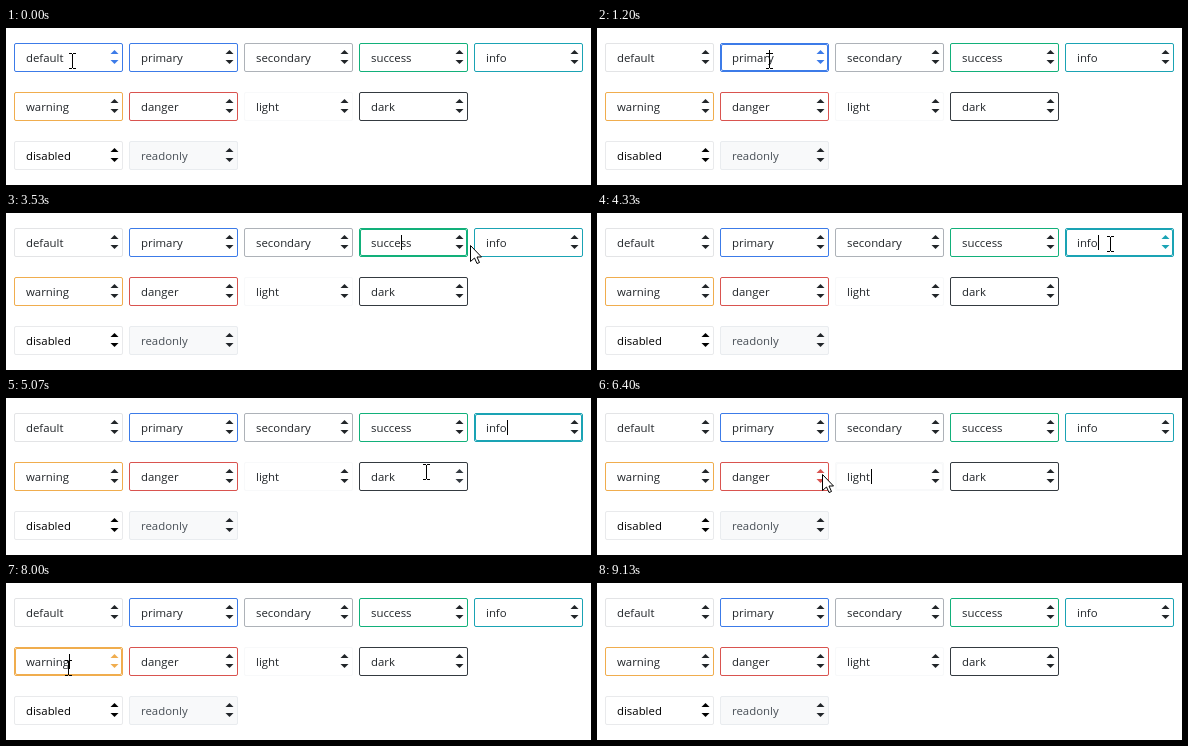
Animation, 585 px wide and 157 px high, one loop 9190 ms. Source, as an HTML page with a canvas:

```html
<!DOCTYPE html>
<html lang="en">
<head>
<meta charset="utf-8">
<title>Number input colours</title>
<style>
html, body { margin: 0; width: 100%; height: 100%; overflow: hidden; background: #fff; }
canvas { display: block; }
</style>
</head>
<body>
<canvas id="stage" width="585" height="157"></canvas>
<script>
const ctx = document.getElementById('stage').getContext('2d');
const LOOP = 9190, TICK = 200 / 3;
const W = 109, H = 29, PAD = 12, INK = '#212529';
const FONT = '11.4px "Open Sans", "Noto Sans", sans-serif';

const rows = [
  { default: '#3c7be8', primary: '#3c7be8', secondary: '#adb2b8', success: '#12b07a', info: '#1aa3b4' },
  { warning: '#f0ad4e', danger: '#d9534f', light: '#f8f9fa', dark: '#343a40' },
  { disabled: '#e9eaec', readonly: '#e9ecef' }
];
const fields = rows.flatMap((row, r) => Object.entries(row).map(([label, color], c) => ({
  label, color, x: 8 + c * 115, y: 15 + r * 49, active: r < 2
})));

// Where the pointer clicks, and on which tick
const visit = (tick, label, x, y) => ({ tick, x, y, field: fields.find(f => f.label === label) });
const visits = [
  visit(2, 'default', 66, 33),
  visit(18, 'primary', 172, 33),
  visit(32, 'secondary', 288, 33),
  visit(47, 'success', 396, 27),
  visit(61, 'info', 513, 31),
  visit(77, 'dark', 420, 74),
  visit(90, 'light', 292, 74),
  visit(104, 'danger', 180, 72),
  visit(120, 'warning', 62, 85),
  visit(137, 'none', 43, 170)
];

// Each trip starts 12 ticks before its click, slows down over 10 ticks and sags a little
function pointerAt(tick) {
  const next = Math.max(1, visits.findLastIndex(v => tick >= v.tick - 12));
  const from = visits[next - 1], to = visits[next];
  const u = Math.min(1, Math.max(0, (tick - to.tick + 12) / 10));
  const ease = Math.sin(u * Math.PI / 2);
  return [
    Math.round(from.x + (to.x - from.x) * ease),
    Math.round(from.y + (to.y - from.y) * ease + 3 * Math.sin(u * Math.PI))
  ];
}

function polygon(points, fill, stroke) {
  ctx.beginPath();
  points.forEach(([x, y]) => ctx.lineTo(x, y));
  ctx.closePath();
  ctx.fillStyle = fill;
  ctx.fill();
  if (stroke) {
    ctx.strokeStyle = stroke;
    ctx.stroke();
  }
}

function ring(f, inset, color) {
  ctx.beginPath();
  ctx.roundRect(f.x + inset + .5, f.y + inset + .5, W - 1 - 2 * inset, H - 1 - 2 * inset, 1.5);
  ctx.strokeStyle = color;
  ctx.stroke();
}

function drawField(f, hovered, focused) {
  const { label, color, x, y, active } = f;
  const lit = hovered || focused;
  if (label === 'readonly') {
    ctx.fillStyle = '#f8f9fa';
    ctx.fillRect(x + 1, y + 1, W - 2, H - 2);
  }
  ring(f, 0, label === 'default' && !lit ? '#e3e4e6' : color);
  if (focused) ring(f, 1, color);

  const ink = label === 'disabled' ? '#000' : INK;
  ctx.fillStyle = label === 'readonly' ? '#495057' : ink;
  ctx.fillText(label, x + PAD, y + 19);

  const mid = x + 100.5, arrowColor = hovered && active ? color : ink;
  for (const [base, tip] of [[11, 7], [17, 21]]) {
    polygon([[mid - 4, y + base], [mid, y + tip], [mid + 4, y + base]], arrowColor);
  }
}

// The caret stands at the letter gap nearest to the click
function drawCaret({ field, x }) {
  const start = field.x + PAD;
  const gaps = [...field.label].map((_, i) => start + ctx.measureText(field.label.slice(0, i + 1)).width);
  const nearest = gaps.reduce((a, b) => Math.abs(b - x) < Math.abs(a - x) ? b : a);
  ctx.fillStyle = '#000';
  ctx.fillRect(Math.round(nearest + .5), field.y + 7, 1, 15);
}

function drawBeam(x, y) {
  ctx.fillStyle = '#000';
  ctx.fillRect(x, y - 7, 1, 14);
  for (const edge of [y - 8, y + 7]) {
    ctx.fillRect(x - 3, edge, 3, 1);
    ctx.fillRect(x + 1, edge, 3, 1);
  }
}

function drawArrow(x, y) {
  const shape = [[0, 0], [0, 16], [4, 12.5], [6.5, 18], [9, 17], [6.5, 11.5], [11, 11.5]];
  polygon(shape.map(([dx, dy]) => [x + dx - .5, y + dy + .5]), '#fff', '#000');
}

function draw(tick) {
  ctx.fillStyle = '#fff';
  ctx.fillRect(0, 0, 585, 157);
  ctx.font = FONT;
  ctx.lineWidth = 1;

  const [x, y] = pointerAt(tick);
  const over = fields.find(f => x >= f.x && x < f.x + W && y >= f.y && y < f.y + H);
  const click = visits.findLast(v => v.tick <= tick);
  const focus = click && click.field;

  fields.forEach(f => drawField(f, f === over, f === focus));
  const blinkOn = focus && (tick - click.tick) * TICK % 1000 < 499;
  if (blinkOn) drawCaret(click);

  const onText = over && over.active && x < over.x + 92;
  (onText ? drawBeam : drawArrow)(x, y);
}

function frame(now) {
  draw(Math.floor((now % LOOP + 4) / TICK));
  requestAnimationFrame(frame);
}
requestAnimationFrame(frame);
</script>
</body>
</html>
```
